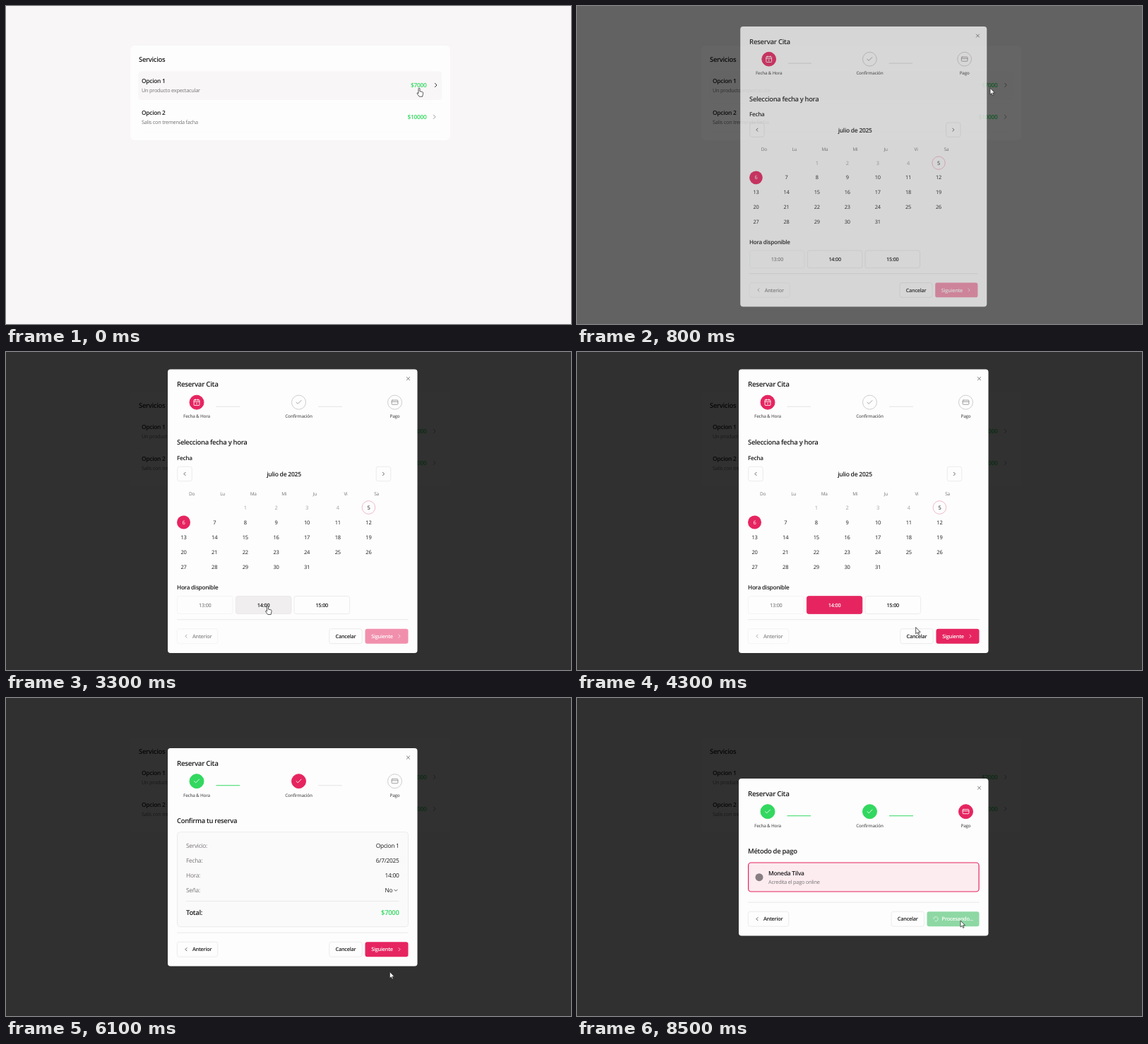
An HTML page for the animation above (8.6 s loop, 800 by 450 pixels).

```html
<!DOCTYPE html>
<html lang="es">
<head>
<meta charset="utf-8">
<title>Reservar Cita</title>
<style>
html, body { margin: 0; width: 100%; height: 100%; overflow: hidden; background: #f8f6f7; }
svg { display: block; width: 800px; height: 450px; }
text { font-family: "Open Sans", "Noto Sans", sans-serif; letter-spacing: -.033em; text-rendering: geometricPrecision; }
</style>
</head>
<body>
<svg id="stage" viewBox="0 0 800 450"></svg>
<script>
const LOOP = 8600, TICK = 100;
const WHITE = [253, 253, 253], PAGE = [248, 246, 247], HOVER = [240, 238, 239];
const INK = [28, 27, 28], MUTED = [118, 115, 117], GREY = [208, 205, 206], EDGE = [230, 228, 229];
const PINK = [230, 37, 96], DEEP = [213, 13, 77], GREEN = [50, 216, 95], LEAF = [34, 181, 77];

let t = 0;
const clamp = x => Math.min(1, Math.max(0, x));
const smooth = x => x * x * (3 - 2 * x);
const fade = (start, length = 150) => smooth(clamp((t - start) / length));
const pulse = (start, end) => fade(start) - fade(end);
const mix = (a, b, p) => a.map((v, i) => Math.round(v + (b[i] - v) * p));
const ramp = ([a, b, c], level) => level > 1 ? mix(b, c, level - 1) : mix(a, b, level);
const rgb = c => c ? `rgb(${c})` : 'none';

// y is the middle of the capital letters
const text = (s, x, y, size, color = INK, weight = 600, anchor = 'start') =>
  `<text x="${x}" y="${y + size * .357}" font-size="${size}" font-weight="${weight}" fill="${rgb(color)}" text-anchor="${anchor}">${s}</text>`;
const box = (x, y, w, h, fill, stroke, r = 3, line = .7) =>
  `<rect x="${x}" y="${y}" width="${w}" height="${h}" rx="${r}" fill="${rgb(fill)}" stroke="${rgb(stroke)}" stroke-width="${line}"/>`;
const disc = (x, y, r, fill, stroke, line = 1) =>
  `<circle cx="${x}" cy="${y}" r="${r}" fill="${rgb(fill)}" stroke="${rgb(stroke)}" stroke-width="${line}"/>`;
const rule = (x1, x2, y, color = EDGE, line = .8) =>
  `<path d="M${x1} ${y}H${x2}" stroke="${rgb(color)}" stroke-width="${line}"/>`;
// Icons are drawn on a 24 unit grid
const icon = (d, x, y, color, size = 10.5, turn = 0) =>
  `<path d="${d}" transform="translate(${x} ${y}) rotate(${turn}) scale(${size / 24}) translate(-12 -12)" fill="none" stroke="${rgb(color)}" stroke-width="2" stroke-linecap="round" stroke-linejoin="round"/>`;
const group = (content, opacity, transform = '') => `<g opacity="${opacity}" transform="${transform}">${content}</g>`;

const RIGHT = 'M9 6l6 6-6 6', LEFT = 'M15 6l-6 6 6 6', DOWN = 'M6 9l6 6 6-6', CROSS = 'M6 6l12 12M18 6L6 18';
const CHECK = 'M20 6L9 17l-5-5';
const CALENDAR = 'M5 4h14q2 0 2 2v14q0 2-2 2H5q-2 0-2-2V6q0-2 2-2zM8 2v4M16 2v4M3 10h18M12 14v4';
const CARD = 'M4 5h16q2 0 2 2v10q0 2-2 2H4q-2 0-2-2V7q0-2 2-2zM2 10h20';
const SPINNER = 'M21 12a9 9 0 1 1-6.2-8.6';

function services() {
  const hover = 1 - fade(690);
  const row = (y, name, note, price, h) =>
    box(187.5, y - 19.5, 429.5, 40.5, mix(WHITE, PAGE, h), null, 4) +
    text(name, 192, y - 6, 8.4) + text(note, 192, y + 7.5, 7.35, MUTED, 400) +
    text(price, 595.5, y + .3, 8.4, GREEN, 600, 'end') +
    icon(RIGHT, 606.7 + 2 * h, y, mix([140, 137, 139], INK, h));
  return box(176, 56, 453, 134, WHITE, null, 6) + text('Servicios', 188, 75.7, 9.46) +
    row(112, 'Opcion 1', 'Un producto expectacular', '$7000', hover) +
    row(156.8, 'Opcion 2', 'Salis con tremenda facha', '$10000', 0);
}

function header(top, first, second) {
  const step = (x, label, d, level) =>
    disc(x, top + 46.7, 10, ramp([WHITE, PINK, GREEN], level), ramp([GREY, PINK, GREEN], level)) +
    icon(d, x, top + 46.7, mix([150, 147, 149], WHITE, clamp(level))) +
    text(label, x, top + 66.4, 6.3, [100, 97, 99], 600, 'middle');
  return text('Reservar Cita', 242, top + 21.3, 9.8) + icon(CROSS, 569.5, top + 13.2, [70, 68, 69], 8.4) +
    step(270, 'Fecha &amp; Hora', first ? CHECK : CALENDAR, 1 + first) +
    step(414.5, 'Confirmación', CHECK, first + second) + step(550.5, 'Pago', CARD, second) +
    rule(297.5, 331, top + 52.7, mix(EDGE, GREEN, first), 1.1) +
    rule(442, 476, top + 52.7, mix(EDGE, GREEN, second), 1.1);
}

function footer(bottom, back, cancelX, action) {
  const y = bottom - 23.8;
  return rule(242, 569.5, bottom - 47.3) +
    group(box(242.3, y - 10.5, 57.5, 21, WHITE, EDGE) + icon(LEFT, 255, y, INK, 8.4) +
      text('Anterior', 277.7, y, 7.35, INK, 600, 'middle'), back) +
    box(cancelX - 23.2, y - 10.5, 46.4, 21, WHITE, EDGE) + text('Cancelar', cancelX, y, 7.35, INK, 600, 'middle') +
    action(y);
}

const action = (x, label, labelX, fill, mark) => y =>
  box(x, y - 10.5, 569.5 - x, 21, fill) + text(label, labelX, y, 7.35, WHITE, 600, 'middle') + mark(y);
const next = hover => action(508.5, 'Siguiente', 532.5, mix(PINK, DEEP, hover), y => icon(RIGHT, 557, y, WHITE, 8.4));

function datePanel() {
  const arrow = (x, d) => box(x - 10.3, 162.2, 20.6, 20.6, WHITE, EDGE) + icon(d, x, 172.5, INK, 8.4);
  let out = text('Selecciona fecha y hora', 242, 128, 9.46) + text('Fecha', 242, 150, 8.2) +
    arrow(253, LEFT) + arrow(534.5, RIGHT) + text('julio de 2025', 393.5, 173, 8.6, INK, 600, 'middle');
  ['Do', 'Lu', 'Ma', 'Mi', 'Ju', 'Vi', 'Sa'].forEach((day, i) =>
    out += text(day, 263 + 43.6 * i, 200.5, 6.5, MUTED, 500, 'middle'));
  for (let day = 1; day <= 31; day++) {
    const cell = day + 1, x = 251.5 + 43.65 * (cell % 7), y = 220 + 21 * Math.floor(cell / 7);
    if (day === 5) out += disc(x, y, 9.3, null, [240, 178, 194], .9);
    if (day === 6) out += disc(x, y, 9.5, mix(PINK, DEEP, pulse(1400, 2800)));
    out += text(day, x, y, 7.5, day < 5 ? [165, 162, 164] : day === 6 ? WHITE : INK, 500, 'middle');
  }
  const chosen = fade(3450), hover = fade(3150);
  const slot = (x, label, fill = WHITE, edge = EDGE, ink = INK) =>
    box(x, 345.5, 78.6, 25, fill, edge) + text(label, x + 39.3, 358, 7.35, ink, 600, 'middle');
  out += text('Hora disponible', 242, 333, 8.2) + group(slot(242.5, '13:00'), .5) +
    slot(325.3, '14:00', mix(mix(WHITE, HOVER, hover), PINK, chosen), mix(EDGE, PINK, chosen), mix(INK, WHITE, chosen)) +
    slot(408, '15:00');
  const button = next(pulse(4550, 5000));
  return out + footer(426, .5, 481, y => group(button(y), .5 + .5 * chosen));
}

function confirmPanel() {
  const line = (y, label, value, x = 556.5) =>
    text(label, 255, y, 8.4, MUTED, 400) + text(value, x, y, 8.4, INK, 500, 'end');
  return text('Confirma tu reserva', 242, 174, 9.46) + box(242.5, 189.7, 327, 134, [251, 250, 251], EDGE, 4) +
    line(209.5, 'Servicio:', 'Opcion 1') + line(230.5, 'Fecha:', '6/7/2025') +
    line(251.5, 'Hora:', '14:00') + line(272.5, 'Seña:', 'No', 547.3) + icon(DOWN, 552, 272.2, INK, 8.4) +
    rule(255, 556.5, 287.5) + text('Total:', 255, 303.5, 9.46) +
    text('$7000', 556.5, 303.5, 9.46, GREEN, 600, 'end') +
    footer(379.5, 1, 481, next(pulse(4550, 5000) + fade(6250)));
}

function paymentPanel() {
  const busy = t >= 8000;
  const button = busy
    ? action(495.5, 'Procesando...', 538.8, mix(PINK, LEAF, fade(7900)), y => icon(SPINNER, 508, y, WHITE, 8.4, (t - 8000) * .36))
    : action(491, 'Confirmar Reserva', 530.3, mix(DEEP, PINK, pulse(6800, 7450)), () => '');
  return text('Método de pago', 242, 217, 9.46) + box(242.6, 233, 326.5, 41, [252, 236, 240], PINK, 4, 1.2) +
    disc(258, 253.7, 5.5, [136, 126, 130]) + text('Moneda Tilva', 271, 248.5, 8.4) +
    text('Acredita el pago online', 271, 260.2, 7.35, MUTED, 400) +
    footer(336.5, 1, busy ? 468.3 : 463.8, y => group(button(y), busy ? .5 : 1));
}

function modal() {
  const open = 1 - (1 - clamp((t - 692) / 240)) ** 2.3;
  if (!open) return '';
  const first = fade(4920, 300), second = fade(6785, 300);
  const [top, panel] = second ? [114, paymentPanel] : first ? [71, confirmPanel] : [24.5, datePanel];
  const zoom = .95 + .05 * open;
  return `<rect width="800" height="450" opacity="${.805 * open}"/>` +
    group(box(229, top, 353.5, 2 * (225.25 - top), WHITE, null, 4) + header(top, first, second) + panel(), open,
      `translate(405.75 ${225.25 + 8 * (1 - open)}) scale(${zoom}) translate(-405.75 -225.25)`);
}

const HAND = 'M-1 7V1a1 1 0 0 1 2 0V4.6L4.6 5.4Q5.8 5.8 5.6 7L5.2 9.5 4.6 12H.2L-2.7 8.2Q-3.4 6.8-2.2 6.6L-1 7.6Z';
const ARROW = 'M0 0V9.2L2.1 7.2 3.6 10.4 5 9.8 3.6 6.7H6.5Z';
// [start, end, x, y]
const MOVES = [[800, 1500, 248.5, 244], [2700, 3300, 370.5, 359.5], [3700, 4700, 539, 406],
  [5800, 6500, 550, 359], [6900, 7600, 543, 315]];
const POINTING = [[0, 700], [1400, 2800], [3200, 3800], [4600, 4900], [6300, 6700], [7400, 7900]];

function cursor() {
  let x = 585, y = 116.2;
  for (const [start, end, toX, toY] of MOVES) {
    const p = fade(start, end - start);
    x += (toX - x) * p;
    y += (toY - y) * p;
  }
  const hand = POINTING.some(([from, to]) => t >= from && t <= to && !(from === 0 && t === 700));
  return `<path d="${hand ? HAND : ARROW}" transform="translate(${x} ${y})" fill="#fff" stroke="#222" stroke-width=".75" stroke-linejoin="round"/>`;
}

const stage = document.getElementById('stage');
let shown = -1;
function play(now) {
  t = Math.floor(now % LOOP / TICK) * TICK;
  if (t !== shown) {
    shown = t;
    stage.innerHTML = `<rect width="800" height="450" fill="${rgb(PAGE)}"/>` + services() + modal() + cursor();
  }
  requestAnimationFrame(play);
}
play(0);
</script>
</body>
</html>
```
